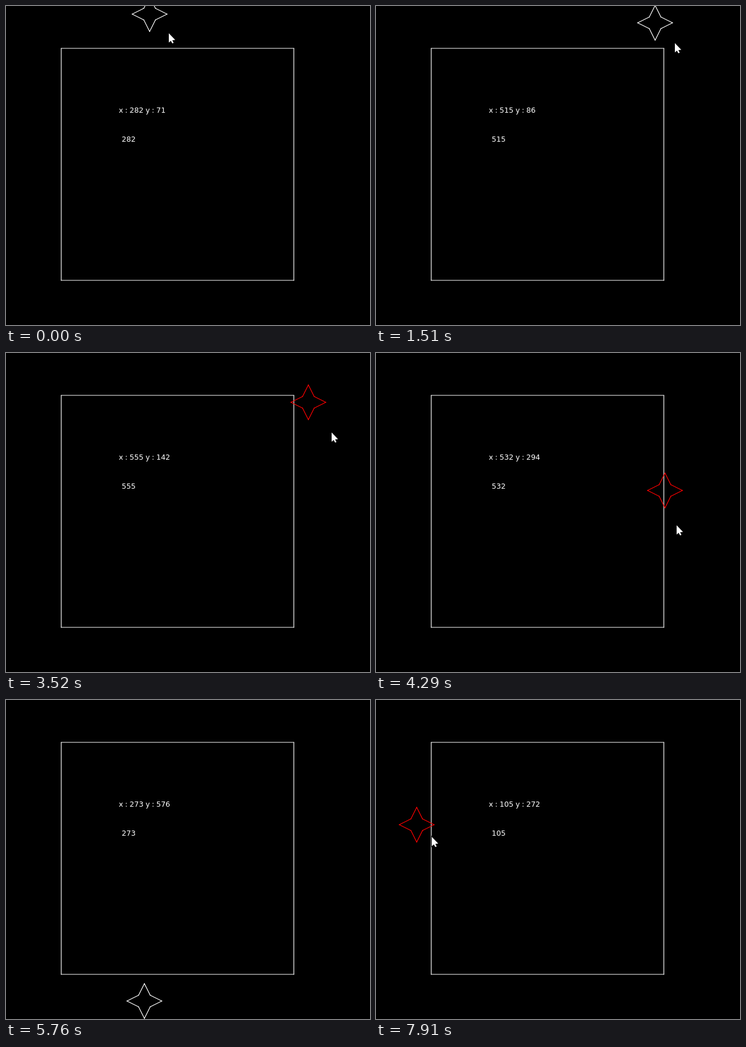
An HTML page with a canvas that plays this animation: 626x550 px, repeating every 7990 ms.

```html
<!DOCTYPE html>
<html lang="en">
<head>
<meta charset="utf-8">
<title>Star follows the mouse</title>
<style>
html, body { margin: 0; width: 100%; height: 100%; overflow: hidden; background: #000; }
canvas { display: block; }
</style>
</head>
<body>
<canvas id="stage" width="626" height="550"></canvas>
<script>
const ctx = document.getElementById('stage').getContext('2d');
const LOOP = 7990, START = 410, TICK = 77.2;

// Mouse turning points: tick, x, y
const path = [
  [1, 282, 71], [11, 503, 82], [15, 515, 86], [22, 519, 100], [27, 519, 100],
  [28, 519, 105], [34, 519, 105], [37, 526, 95], [44, 569, 195], [51, 532, 294],
  [56, 442, 455], [67, 362, 540], [70, 273, 576], [71, 258, 585], [74, 258, 585],
  [82, 92, 507], [83, 98, 496], [84, 106, 482], [90, 68, 385], [95, 100, 290],
  [98, 105, 272], [99, 98, 260]
];

function slope(i, c) {
  const a = path[i], b = path[i + 1];
  return a && b ? (b[c] - a[c]) / (b[0] - a[0]) : 0;
}

// Tangent that never overshoots a turning point
function tangent(i, c) {
  const p = slope(i - 1, c), q = slope(i, c);
  return p * q > 0 ? 2 * p * q / (p + q) : 0;
}

function mouse(tick) {
  let i = 0;
  while (i < path.length - 2 && path[i + 1][0] <= tick) i++;
  const a = path[i], b = path[i + 1], d = b[0] - a[0];
  const u = Math.min(1, Math.max(0, (tick - a[0]) / d)), v = 1 - u;
  return [1, 2].map(c => Math.round(
    v * v * (1 + 2 * u) * a[c] + u * u * (3 - 2 * u) * b[c] +
    d * u * v * (v * tangent(i, c) - u * tangent(i + 1, c))));
}

// Each side is its own stroke, so the corners overlap
function outline(points, color) {
  ctx.strokeStyle = color;
  ctx.lineWidth = 1.2;
  ctx.lineCap = 'round';
  points.forEach((p, i) => {
    ctx.beginPath();
    ctx.moveTo(...p);
    ctx.lineTo(...points[(i + 1) % points.length]);
    ctx.stroke();
  });
}

const box = [[95, 73], [495, 73], [495, 473], [95, 473]];

function star(x, y) {
  return Array.from({ length: 8 }, (_, i) => {
    const a = i * Math.PI / 4, r = i % 2 ? Math.hypot(10, 10) : 30;
    return [x + r * Math.cos(a), y + r * Math.sin(a)];
  });
}

function pointer(x, y) {
  const shape = new Path2D('M0-1V15L3.5 12 6 16.6 8.3 15.6 6 11 11 10.5Z');
  ctx.save();
  ctx.translate(x, y);
  ctx.strokeStyle = '#000';
  ctx.lineWidth = 2;
  ctx.stroke(shape);
  ctx.fill(shape);
  ctx.restore();
}

function draw(t) {
  const tick = Math.max(0, Math.floor((t - START) / TICK) + 1);
  const [x, y] = mouse(tick), [nx, ny] = mouse(tick + 1);
  const sx = x - 35, sy = y - 57;
  const hit = sx + 30 > 95 && sx - 30 < 495 && sy + 30 > 73 && sy - 30 < 473;

  ctx.fillStyle = '#000';
  ctx.fillRect(0, 0, 626, 550);
  outline(box, '#fff');

  ctx.fillStyle = '#fff';
  ctx.font = '12.5px "DejaVu Sans", sans-serif';
  ctx.wordSpacing = '-0.5px';
  ctx.fillText(`x : ${x} y : ${y}`, 194, 184);
  ctx.fillText(x, 199, 234);

  outline(star(sx, sy), hit ? '#f00' : '#fff');
  // The pointer runs one tick ahead of the star
  pointer(nx - 2, ny - 23);
}

let begin;
function frame(now) {
  begin ??= now;
  draw((now - begin) % LOOP);
  requestAnimationFrame(frame);
}
draw(0);
requestAnimationFrame(frame);
</script>
</body>
</html>
```
